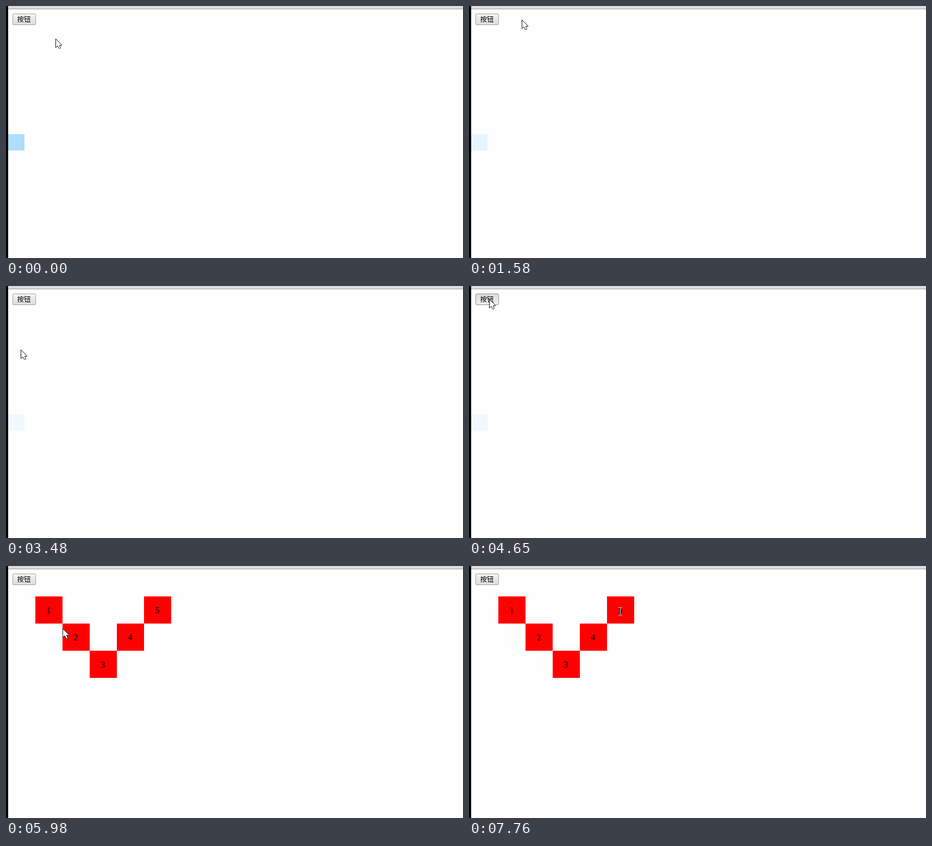
These frames come from a looping animation (841x464 px, 8000 ms). An HTML page with a canvas:

```html
<!DOCTYPE html>
<html lang="zh">
<head>
<meta charset="utf-8">
<title>按钮</title>
<style>
html, body { margin: 0; width: 100%; height: 100%; overflow: hidden; background: #fefefe; }
canvas { display: block; }
</style>
</head>
<body>
<canvas id="stage" width="841" height="464"></canvas>
<script>
const ctx = document.getElementById('stage').getContext('2d');
const LOOP = 8000, PRESS = 4650, RELEASE = 4800;
const STEP = 130; // ms between pointer updates

// Pointer legs: each starts `steps` updates before it reaches its end point.
const home = { x: 91, y: 60 };
const legs = [
  { end: 580, steps: 3, x: 124, y: 65 },
  { end: 1165, steps: 3, x: 45, y: 27 },
  { end: 1580, steps: 3, x: 97, y: 25 },
  { end: 1850, steps: 2, x: 130, y: 49 },
  { end: 2140, steps: 2, x: 155, y: 105 },
  { end: 2660, steps: 4, x: 93, y: 247 },
  { end: 3050, steps: 3, x: 62, y: 219 },
  { end: 3480, steps: 3, x: 27, y: 117 },
  { end: 4060, steps: 4, x: 37, y: 24 },
  { end: 5980, steps: 6, x: 104, y: 115 },
  { end: 6370, steps: 3, x: 122, y: 133 },
  { end: 6784, steps: 3, x: 178, y: 190 },
  { end: 7180, steps: 3, x: 232, y: 137 },
  { end: 7760, steps: 3, x: 278, y: 84 }
];

const tiles = Array.from({ length: 5 }, (_, i) => ({
  label: i + 1, x: 54 + 50 * i, y: 156 - 50 * Math.abs(i - 2)
}));

const lerp = (a, b, k) => Math.round(a + (b - a) * k);

function pointerAt(t) {
  const i = legs.findIndex(leg => t < leg.end);
  if (i < 0) return legs[legs.length - 1];
  const from = legs[i - 1] || home, to = legs[i];
  const done = Math.floor((t - to.end) / STEP) + to.steps;
  const k = Math.max(0, done) / to.steps;
  return { x: lerp(from.x, to.x, k), y: lerp(from.y, to.y, k) };
}

function rect(x, y, w, h, color) {
  ctx.fillStyle = color;
  ctx.fillRect(x, y, w, h);
}

function paint(fill, stroke) {
  ctx.fillStyle = fill;
  ctx.fill();
  ctx.strokeStyle = stroke;
  ctx.stroke();
}

function drawBadge(t) {
  const fade = Math.min(1, Math.max(0, (t - 310) / 1540));
  ctx.globalAlpha = 1 - 0.83 * fade;
  rect(4, 236, 30, 30, '#b0dcfd');
  ctx.globalAlpha = 1;
}

function drawButton(hover, pressed) {
  const shade = ctx.createLinearGradient(0, 15, 0, 34);
  shade.addColorStop(0, pressed ? '#dddddd' : '#f6f6f6');
  shade.addColorStop(1, pressed ? '#f0f0f0' : '#dddddd');
  ctx.beginPath();
  ctx.roundRect(12.5, 14.5, 42, 20, 1.5);
  paint(shade, hover ? '#909090' : '#a0a0a0');
  ctx.fillStyle = '#000';
  ctx.font = '12.5px "Noto Sans CJK SC", "Noto Sans CJK", sans-serif';
  ctx.textAlign = 'left';
  ctx.fillText('按钮', 20.5, 29);
}

function drawTiles() {
  ctx.font = '16px "Liberation Serif", serif';
  ctx.textAlign = 'center';
  for (const { label, x, y } of tiles) {
    rect(x, y, 50, 50, '#f00');
    ctx.fillStyle = '#000';
    ctx.fillText(label, x + 24.5, y + 31);
  }
}

function drawArrow(x, y) {
  const outline = [[0, 0], [0, 16], [3.5, 13], [6, 17.5], [7, 18], [8, 18], [9, 17], [7, 12], [11, 12], [11, 11]];
  ctx.beginPath();
  outline.forEach(([dx, dy]) => ctx.lineTo(x + dx + 0.5, y + dy + 0.5));
  ctx.closePath();
  paint('#fff', '#10101c');
}

function drawBeam(x, y) {
  ctx.globalCompositeOperation = 'difference';
  rect(x, y - 7, 1, 14, '#fff');
  for (const end of [y - 8, y + 7]) {
    rect(x - 3, end, 3, 1, '#fff');
    rect(x + 1, end, 3, 1, '#fff');
  }
  ctx.globalCompositeOperation = 'source-over';
}

function draw(t) {
  const { x, y } = pointerAt(t);
  const open = t >= RELEASE;
  const hover = x >= 12 && x < 55 && y >= 14 && y < 35;
  const onDigit = tile => Math.abs(x - tile.x - 25) < 6 && Math.abs(y - tile.y - 25) < 8;
  rect(0, 0, 841, 464, '#fefefe');
  rect(4, 0, 837, 5, '#dcdcdc');
  rect(4, 5, 837, 1, '#a3a3a3');
  rect(0, 0, 4, 464, '#000');
  drawButton(hover, t >= PRESS && !open);
  if (open) drawTiles();
  else drawBadge(t);
  if (open && tiles.some(onDigit)) drawBeam(x, y);
  else drawArrow(x, y);
}

const start = performance.now();
function tick() {
  draw((performance.now() - start) % LOOP);
  requestAnimationFrame(tick);
}
tick();
</script>
</body>
</html>
```
